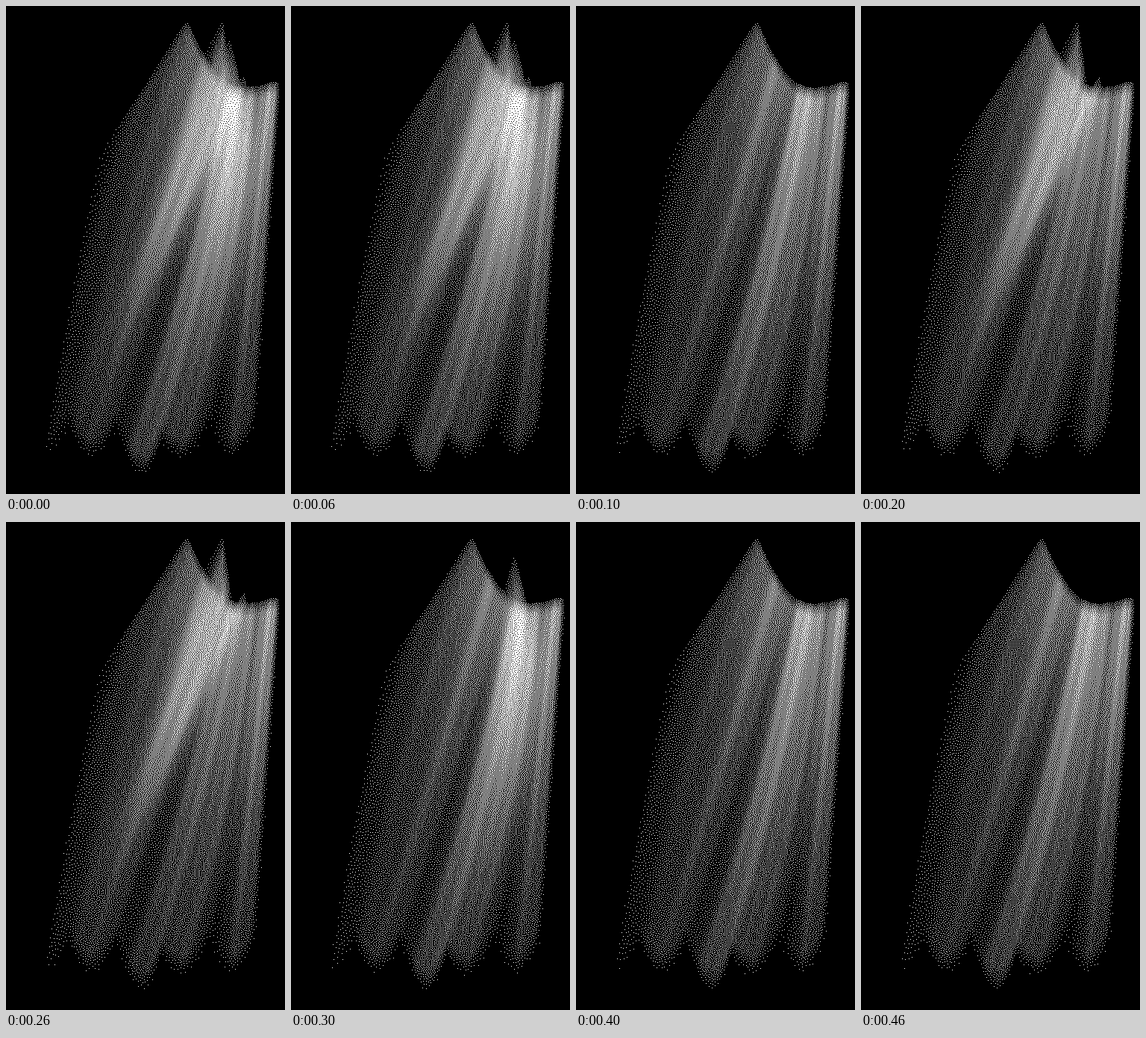
These frames come from a looping animation (374 by 653 pixels, 500 ms). An HTML page with a canvas:

```html
<!DOCTYPE html>
<html lang="en">
<head>
<meta charset="utf-8">
<title>Stippled light</title>
<style>
html, body { margin: 0; width: 100%; height: 100%; overflow: hidden; background: #000; }
canvas { display: block; width: 374px; height: 653px; image-rendering: pixelated; }
</style>
</head>
<body>
<canvas id="stage" width="374" height="653"></canvas>
<script>
const W = 374, H = 653, STEP = 100;
const ctx = document.getElementById('stage').getContext('2d');

const clamp = v => Math.max(0, Math.min(1, v));
const mix = (a, b, t) => a + (b - a) * t;
const bell = d => Math.exp(-d * d);

// A ray runs from column `from` near the top to column `to` near the bottom.
const halo = { from: 225, to: 92, bow: -10, power: .22, fall: 1.4, thin: 45, wide: 42 };
const slope = { from: 268, to: 118, bow: 4, power: .45, fall: 1.7, thin: 26, wide: 27 };
const core = { from: 310, to: 190, bow: 10, power: 1.1, fall: 1.7, thin: 15, wide: 30 };
const fill = { from: 330, to: 238, bow: 13, power: .6, fall: 1.6, thin: 15, wide: 24 };
const rim = { from: 356, to: 310, bow: 0, power: 1, fall: 2.1, thin: 10, wide: 22 };

// Lamps rise above the veil in a spike and fade out sooner.
const lampA = { from: 284, to: 70, bow: 18, power: .7, fall: 5, thin: 22, wide: 30,
  tip: { x: 290, y: 8, left: 1.6, right: 7, ramp: 90 } };
const glint = { from: 314, to: 100, bow: 0, power: .45, fall: 8, thin: 10, wide: 16,
  tip: { x: 320, y: 89, left: 1.5, right: 6, ramp: 20 } };
const lampB = { from: 312, to: 225, bow: 18, power: .8, fall: 5, thin: 22, wide: 30,
  tip: { x: 299, y: 34, left: 3.2, right: 4, ramp: 80 } };

function veilTop(x) {
  if (x > 320) return 107 - 9 * clamp((x - 320) / 42);
  return 107 - 97 * Math.pow(1 - clamp((x - 242) / 78), 2.2);
}

function rayTop(ray, x) {
  const veil = veilTop(x), tip = ray.tip;
  if (!tip) return veil;
  const off = x - tip.x;
  return Math.min(veil, tip.y + (off < 0 ? -off * tip.left : off * tip.right));
}

const leftKeys = [[12, 240], [110, 178], [190, 116], [330, 90], [600, 44]];
function leftEdge(y) {
  let i = 1;
  while (i < leftKeys.length - 1 && y > leftKeys[i][0]) i++;
  const [p, a] = leftKeys[i - 1], [q, b] = leftKeys[i];
  return mix(a, b, (y - p) / (q - p));
}
const rightEdge = y => 369 - .07 * (y - 110);

// Five hanging lobes, the middle one longest.
const hem = x => 568 + 38 * Math.abs(Math.cos(Math.PI * (x - 115) / 62)) +
  25 * bell((x - 190) / 30);

function addRay(sum, ray, gain, phase) {
  const ramp = ray.tip ? ray.tip.ramp : 20;
  const tops = Array.from({ length: W }, (_, x) => rayTop(ray, x));
  for (let y = 0; y < H; y++) {
    const s = (y - 100) / 480, t = Math.max(0, s);
    const mid = mix(ray.from, ray.to, s) + ray.bow * 4 * s * (1 - s);
    const width = mix(ray.thin, ray.wide, t);
    const power = gain * ray.power * Math.exp(-ray.fall * (ray.tip ? t * t : t));
    for (let x = 0; x < W; x++) {
      const lit = clamp((y - tops[x]) / ramp);
      if (!lit) continue;
      const d = (x - mid) / width;
      sum[y * W + x] += power * lit * bell(d) * (1 + .18 * Math.cos(7 * d + phase));
    }
  }
}

function light(a, b, glow) {
  const sum = new Float32Array(W * H);
  const rays = [[halo, 1], [slope, 1], [core, glow], [fill, 1], [rim, 1],
    [lampA, a], [glint, a], [lampB, b]];
  rays.forEach(([ray, gain], i) => gain && addRay(sum, ray, gain, 2 * i));
  return sum.map((v, i) => {
    const x = i % W, y = Math.floor(i / W);
    const mask = clamp((x - leftEdge(y)) / 14) * clamp((rightEdge(y) - x) / 9) *
      clamp((hem(x) - y) / 30);
    return mask * (1 - Math.exp(-1.25 * v));
  });
}

function seeded(seed) {
  return () => (seed = (seed * 16807) % 2147483647) / 2147483647;
}

// Turns the light into white dots, handing each rest on in a zigzag of rows.
function stipple(field) {
  const img = ctx.createImageData(W, H);
  const pix = new Uint32Array(img.data.buffer);
  const random = seeded(7);
  const give = (x, y, v) => {
    if (x >= 0 && x < W && y < H) field[y * W + x] += v / 16;
  };
  for (let y = 0; y < H; y++) {
    const dir = y % 2 ? -1 : 1;
    for (let n = 0; n < W; n++) {
      const x = dir > 0 ? n : W - 1 - n, i = y * W + x;
      const on = field[i] > .5 + .1 * (random() - .5);
      const rest = field[i] - on;
      pix[i] = on ? 0xffffffff : 0xff000000;
      give(x + dir, y, rest * 7);
      give(x - dir, y + 1, rest * 3);
      give(x, y + 1, rest * 5);
      give(x + dir, y + 1, rest);
    }
  }
  return img;
}

const scene = (a, b, glow) => stipple(light(a, b, glow));
const calm = scene(0, 0, 1);
const loop = [scene(1, 1, 1), calm, scene(1, 0, .7), scene(0, 1, 1), calm];

let start = null, shown = null;
function draw(now) {
  if (start === null) start = now;
  const next = loop[Math.floor((now - start) / STEP) % loop.length];
  if (next !== shown) ctx.putImageData(shown = next, 0, 0);
  requestAnimationFrame(draw);
}
ctx.putImageData(loop[0], 0, 0);
requestAnimationFrame(draw);
</script>
</body>
</html>
```
